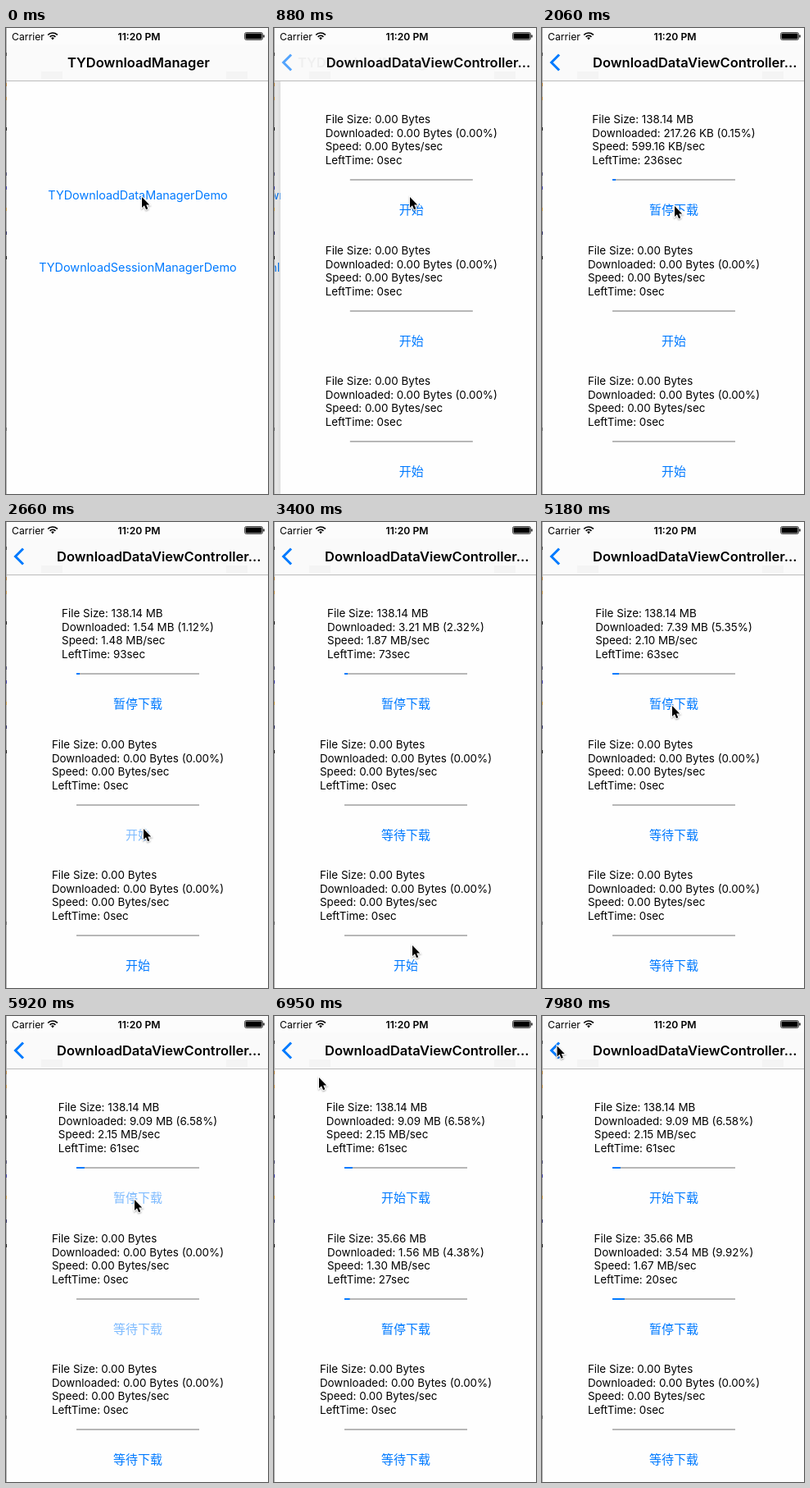
These frames come from a looping animation (320 px wide and 568 px high, 8 s). An HTML page with a canvas:

```html
<!DOCTYPE html>
<html lang="en">
<head>
<meta charset="utf-8">
<title>Download manager demo</title>
<style>
  html, body { margin: 0; width: 100%; height: 100%; overflow: hidden; background: #fff; }
  canvas { display: block; width: 320px; height: 568px; }
</style>
</head>
<body>
<canvas id="stage" width="320" height="568"></canvas>
<script>
const ctx = document.getElementById('stage').getContext('2d');
const LOOP = 8000, FIRST_STEP = 434, STEP = 147.85;
const CENTER = 161, BLUE = '#007aff', PAGE = '#fefefe', BAR = '#fafafa';
const LATIN = 'Inter, "Noto Sans", sans-serif';
const CJK = '"Noto Sans CJK SC", "Noto Sans CJK", "Noto Sans CJK JP", sans-serif';
const START = '开始', PAUSE = '暂停下载', WAIT = '等待下载', RESUME = '开始下载';

// Keys are [step, value...]; values are linear in between and held outside.
const cursorPath = [
  [7, 166, 206], [8, 163, 215], [9, 162, 217], [12, 162, 217], [13, 165, 300], [14, 168, 374],
  [17, 168, 374], [18, 169, 405], [19, 169, 475], [20, 169, 516], [21, 168, 536], [24, 168, 536],
  [25, 169, 450], [26, 169, 325], [27, 169, 236], [29, 165, 224], [33, 157, 224], [40, 157, 224],
  [42, 120, 165], [44, 55, 75], [46, 19, 38], [47, 18.5, 36.5]
];

const tasks = [
  {
    top: 0, size: 138.14, begins: 11,
    done: [[11, .21217], [20, 3.21], [27, 5.69], [37, 9.09]],
    speed: [[11, .585117], [14, 1.4], [20, 1.87], [27, 2.06], [37, 2.15]],
    titles: [[0, START], [10, PAUSE], [38, RESUME]], faded: [9, 37]
  },
  {
    top: 160, size: 35.66, begins: 39,
    done: [[39, .15], [51, 3.538]],
    speed: [[39, .45], [42, 1.2], [51, 1.67]],
    titles: [[0, START], [16, WAIT], [38, PAUSE]], faded: [15, 37]
  },
  {
    top: 319, size: 0, begins: Infinity,
    titles: [[0, START], [23, WAIT]], faded: [22]
  }
];

function valuesAt(keys, step) {
  const next = keys.findIndex(key => key[0] > step);
  if (next === 0) return keys[0].slice(1);
  if (next < 0) return keys[keys.length - 1].slice(1);
  const a = keys[next - 1], b = keys[next];
  const mix = (step - a[0]) / (b[0] - a[0]);
  return a.slice(1).map((v, i) => v + (b[i + 1] - v) * mix);
}

function bytes(mb) {
  if (!mb) return '0.00 Bytes';
  return mb < 1 ? (mb * 1024).toFixed(2) + ' KB' : mb.toFixed(2) + ' MB';
}

function rect(x, y, w, h, color) {
  ctx.fillStyle = color;
  ctx.fillRect(x, y, w, h);
}

function text(string, x, y, font, color = '#000', align = 'left') {
  ctx.font = font;
  ctx.textAlign = align;
  ctx.fillStyle = color;
  ctx.fillText(string, x, y);
}

function withAlpha(alpha, draw) {
  ctx.save();
  ctx.globalAlpha *= Math.max(0, Math.min(1, alpha));
  draw();
  ctx.restore();
}

function drawMenu(shift, pressed) {
  const font = `14.4px ${LATIN}`;
  withAlpha(pressed ? .35 : 1, () =>
    text('TYDownloadDataManagerDemo', CENTER + shift, 209, font, BLUE, 'center'));
  text('TYDownloadSessionManagerDemo', CENTER + shift, 297, font, BLUE, 'center');
}

function drawTask(task, step) {
  const running = step >= task.begins;
  const size = running ? task.size : 0;
  const done = running ? valuesAt(task.done, step)[0] : 0;
  const speed = running ? valuesAt(task.speed, step)[0] : 0;
  const part = running ? done / size : 0;
  const lines = [
    `File Size: ${bytes(size)}`,
    `Downloaded: ${bytes(done)} (${(part * 100).toFixed(2)}%)`,
    `Speed: ${bytes(speed)}/sec`,
    `LeftTime: ${running ? Math.ceil((size - done) / speed) : 0}sec`
  ];
  const font = `13.4px ${LATIN}`;
  ctx.font = font;
  const left = CENTER - ctx.measureText(lines[1]).width / 2;
  lines.forEach((line, i) => text(line, left, task.top + Math.round(116 + 16.5 * i), font));

  rect(86, task.top + 184, 150, 2, '#b7b7b7');
  if (running) rect(86, task.top + 184, Math.max(4, part * 150), 2, BLUE);

  const title = task.titles.filter(([from]) => step >= from).pop()[1];
  withAlpha(task.faded.includes(step) ? .5 : 1, () =>
    text(title, CENTER, task.top + 227, `15px ${CJK}`, BLUE, 'center'));
}

function drawTasks(shift, step) {
  ctx.save();
  ctx.translate(shift, 0);
  ctx.shadowColor = 'rgba(0,0,0,.15)';
  ctx.shadowBlur = shift > .5 ? 5 : 0;
  rect(1, 65, 320, 503, PAGE);
  ctx.shadowColor = 'transparent';
  tasks.forEach(task => drawTask(task, step));
  ctx.restore();
}

function drawStatus() {
  text('Carrier', 7, 15, `12.2px ${LATIN}`);
  text('11:20 PM', 162.5, 15, `600 12.2px ${LATIN}`, '#000', 'center');

  ctx.strokeStyle = '#000';
  ctx.lineWidth = 1.7;
  [4.6, 8].forEach(radius => {
    ctx.beginPath();
    ctx.arc(57, 14, radius, -Math.PI * .76, -Math.PI * .24);
    ctx.stroke();
  });
  ctx.fillStyle = '#000';
  ctx.beginPath();
  ctx.moveTo(57, 14.6);
  ctx.arc(57, 14, 2.5, -Math.PI * .76, -Math.PI * .24);
  ctx.fill();

  ctx.lineWidth = .7;
  ctx.beginPath();
  ctx.roundRect(291.5, 5.5, 22, 9, 2);
  ctx.stroke();
  ctx.beginPath();
  ctx.roundRect(292.5, 6.5, 20, 7, 1);
  ctx.fill();
  rect(314.3, 8.5, 1.3, 3, '#000');
}

function drawNavBar(left, step) {
  const font = `600 16.5px ${LATIN}`;
  rect(0, 0, 320, 64, BAR);
  rect(0, 0, 320, 20, '#fcfcfc');
  rect(43, 53, 26, 9, '#f4f4f4');
  rect(269, 53, 26, 9, '#f4f4f4');
  rect(0, 64, 320, 1, '#bcbcbc');
  withAlpha(left === 1 ? 1 : left * 2, () =>
    text('TYDownloadManager', 75 - 47 * (1 - left), 48, font));
  if (left < 1) {
    withAlpha(1 - left * 1.2, () =>
      text('DownloadDataViewController…', 62 + 80 * left, 48, font));
    withAlpha((step - 1) / 3, () => {
      ctx.strokeStyle = BLUE;
      ctx.lineWidth = 3;
      ctx.beginPath();
      ctx.moveTo(21, 32.5);
      ctx.lineTo(11.5, 42);
      ctx.lineTo(21, 51.5);
      ctx.stroke();
    });
  }
  drawStatus();
}

// Sliver of the desktop that shows beside the window.
function drawEdge() {
  rect(0, 0, 1, 568, '#b4b4b4');
  [[30, '#555'], [67, '#b98a4a'], [84, '#c59a55'], [121, '#222'], [176, '#557'],
   [193, '#44a'], [219, '#c9a050'], [248, '#336'], [278, '#222'], [487, '#777']]
    .forEach(([y, color]) => rect(0, y, 1, 4, color));
}

function drawCursor(x, y) {
  ctx.save();
  ctx.translate(x, y);
  ctx.beginPath();
  [[0, 0], [0, 13], [3, 10.3], [5.1, 15.2], [7.3, 14.2], [5.2, 9.5], [9.2, 9.5]]
    .forEach(point => ctx.lineTo(...point));
  ctx.closePath();
  ctx.shadowColor = 'rgba(0,0,0,.35)';
  ctx.shadowBlur = 2;
  ctx.shadowOffsetY = 1;
  ctx.strokeStyle = '#fff';
  ctx.lineWidth = 2;
  ctx.stroke();
  ctx.shadowColor = 'transparent';
  ctx.fillStyle = '#000';
  ctx.fill();
  ctx.restore();
}

// Share of the push transition still to go: a critically damped spring.
function pushLeft(step) {
  const u = Math.max(0, (step - .6) * 2.4);
  return step > 5 ? 0 : (1 + u) * Math.exp(-u);
}

function draw(time) {
  const step = Math.floor((time - FIRST_STEP) / STEP);
  const left = pushLeft(step);
  rect(0, 0, 320, 568, PAGE);
  if (left > 0) {
    drawMenu(-97 * (1 - left), step === 0);
    rect(0, 65, 320, 503, `rgba(0,0,0,${.1 * (1 - left)})`);
  }
  if (left < 1) drawTasks(320 * left, step);
  drawNavBar(left, step);
  drawEdge();
  drawCursor(...valuesAt(cursorPath, step));
}

const began = performance.now();
function tick() {
  draw((performance.now() - began) % LOOP);
  requestAnimationFrame(tick);
}
tick();
</script>
</body>
</html>
```
